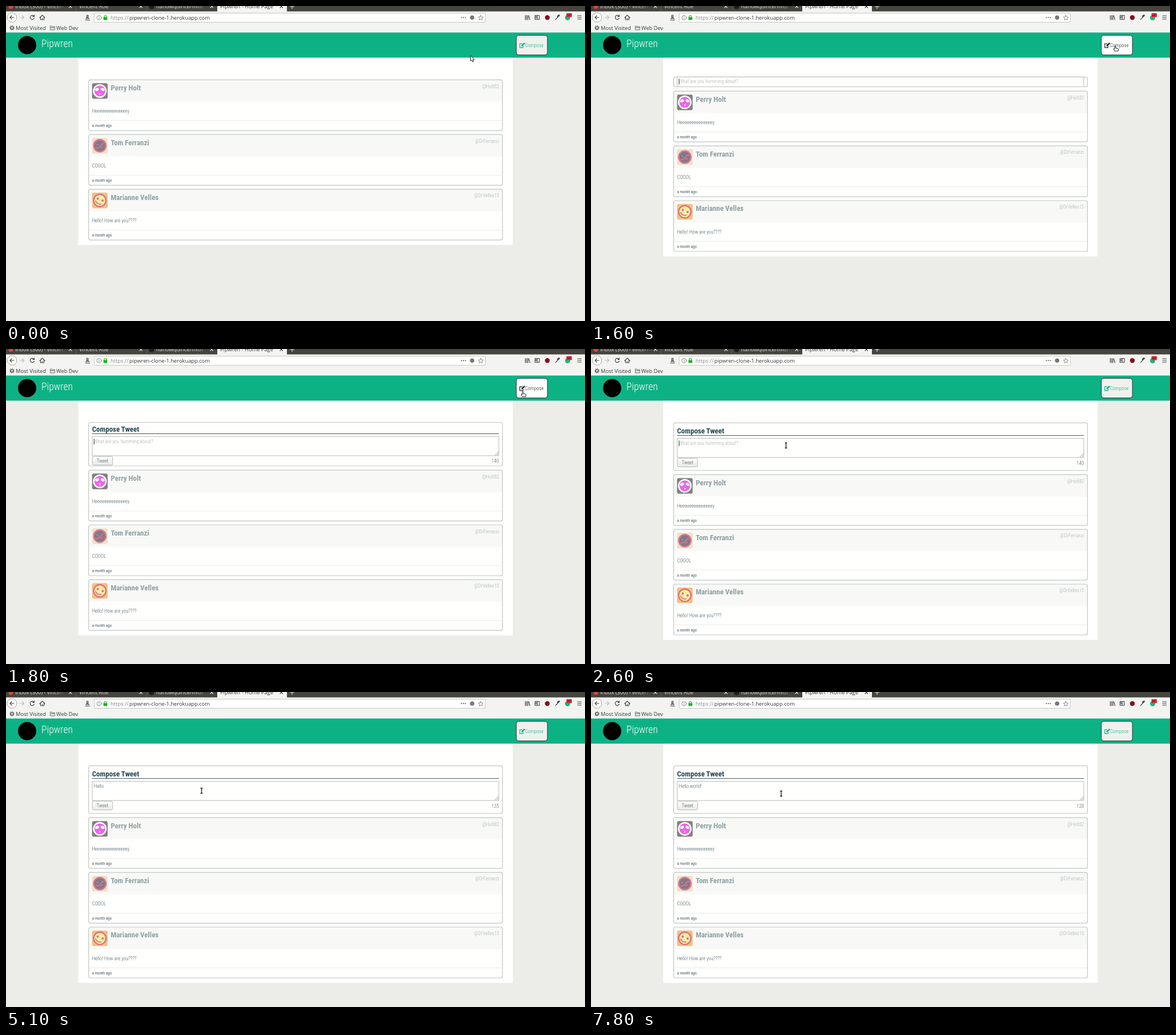
Recreate the animation shown at these times as an HTML page. Size 1014 px wide and 552 px high, loop 8000 ms.

```html
<!DOCTYPE html>
<html lang="en">
<head>
<meta charset="utf-8">
<title>Compose box</title>
<style>
  html, body { margin: 0; width: 100%; height: 100%; overflow: hidden; background: #ecede9; }
  #stage { display: block; width: 100%; height: 100%; }
  text { white-space: pre; }
  .ui { font: 9.3px "Open Sans", "Noto Sans", sans-serif; fill: #35383a; }
  .tab { fill: #d8d7d0; }
  .app { font: 300 8.8px "Roboto Condensed", Roboto, sans-serif; font-stretch: 75%; fill: #435a64; }
  .title { font-size: 17.6px; fill: #fff; }
  .name { font-size: 13px; font-weight: 700; fill: #8fa0a4; }
  .heading { font-size: 13px; font-weight: 700; fill: #244751; }
  .handle { fill: #a3b0b4; }
  .age { font-size: 7px; font-weight: 400; }
  .hint { fill: #a5a8a8; }
  .end { text-anchor: end; }
  .mid { text-anchor: middle; }
  .line { fill: none; stroke: #45484a; stroke-width: 1.2; stroke-linecap: round; stroke-linejoin: round; }
</style>
</head>
<body>
<svg id="stage" viewBox="0 0 1014 552" preserveAspectRatio="none">
  <defs>
    <linearGradient id="fade"><stop stop-color="#45443e" stop-opacity="0"/><stop offset="1" stop-color="#45443e"/></linearGradient>
    <linearGradient id="face" x2="0" y2="1"><stop stop-color="#fffffd"/><stop offset="1" stop-color="#e9eae8"/></linearGradient>
  </defs>

  <!-- browser tabs -->
  <rect width="1014" height="10" fill="#45443e"/>
  <rect x="370" width="122" height="10" fill="#f3f4f1"/>
  <g class="ui">
    <circle cx="8.500" cy="1" r="4" fill="#d9473d"/>
    <circle cx="255" cy="1" r="4.500" fill="#1c1d1e"/>
    <text class="tab" x="16" y="4">Inbox (300) - vincen</text>
    <text class="tab" x="128" y="4">Vincent Roe</text>
    <text class="tab" x="263" y="4">harlowquince/midt</text>
    <text x="375" y="4">Pipwren - Home Page</text>
  </g>
  <rect x="84" width="22" height="9" fill="url(#fade)"/>
  <rect x="332" width="22" height="9" fill="url(#fade)"/>
  <path d="M122.500 0v9M246.500 0v9" stroke="#5b5a53"/>
  <path class="line" style="stroke:#d8d7d0" d="M110.500-1.500l4.500 4.500m0-4.500l-4.500 4.500M234-1.500l4.500 4.500m0-4.500l-4.500 4.500M358-1.500l4.500 4.500m0-4.500l-4.500 4.500M497.500 1h7M501-2v6.500"/>
  <path class="line" d="M480-1.500l4.500 4.500m0-4.500l-4.500 4.500"/>

  <!-- toolbar -->
  <rect y="9.500" width="1014" height="37" fill="#f3f4f1"/>
  <rect x="154.500" y="12.500" width="685" height="16" rx="1.500" fill="#fffffd" stroke="#c6c7c4"/>
  <circle cx="10.500" cy="20" r="8.300" fill="#fdfdfb" stroke="#a5a6a4"/>
  <g class="line">
    <path d="M14 20H7m3-3l-3 3 3 3"/>
    <path d="M24.500 20h7m-3-3l3 3-3 3" stroke="#bcbdbb"/>
    <path d="M49 18a3.600 3.600 0 1 0 .3 3.300M49.500 15.800v2.600h-2.700"/>
    <path d="M59 20.500l4.500-4.500 4.500 4.500M60.500 20v4h6v-4M63.500 24v-2.500"/>
    <path d="M139 24.500h7.500M140 22l2.500-2.500 3 2.500z"/>
    <circle cx="142.700" cy="17.700" r="1.500"/>
    <path d="M909.500 16.500v7.500M911.800 16.500v7.500M914 16.500v7.500M915.500 17l2 7"/>
    <path d="M926.500 16.500h7.500v7h-7.500zM927 18.500h3m-3 2h3M930.300 16.500v7"/>
    <path d="M962.500 23.500l4.500-4.500"/><path d="M966.500 18l2-1.500" stroke-width="3"/>
    <path d="M1001 17h6.500m-6.500 3h6.500m-6.500 3h6.500"/>
    <g stroke="#77797a" stroke-width=".9">
      <circle cx="163" cy="20.500" r="3.800"/><path d="M163 20v2.300M163 18.300v.1"/>
      <path d="M831.500 16.300l1.300 2.700 3 .4-2.200 2.100.6 3-2.700-1.500-2.700 1.500.6-3-2.200-2.100 3-.4z"/>
    </g>
  </g>
  <path d="M172 20v-1.500a2 2 0 0 1 4 0v1.500" fill="none" stroke="#13b51d" stroke-width="1.200"/>
  <rect x="170.700" y="19.500" width="6.700" height="5" rx=".7" fill="#13b51d"/>
  <g fill="#55585a"><circle cx="797.500" cy="20.300" r="1"/><circle cx="801" cy="20.300" r="1"/><circle cx="804.500" cy="20.300" r="1"/></g>
  <circle cx="816.300" cy="20.300" r="3.800" fill="#77797a"/>
  <circle cx="948" cy="20.300" r="4.200" fill="#85111f"/>
  <circle cx="983.500" cy="20.500" r="4.500" fill="#17b978"/>
  <rect x="981.500" y="12.500" width="9.500" height="7" rx="1" fill="#d92c3a"/>
  <text class="ui" x="982.500" y="17.700" style="font-size:5px;fill:#5a0d14">off</text>
  <g class="ui">
    <text x="183" y="23.700" fill-opacity=".62">https://</text>
    <text x="216" y="23.700">pipwren-clone-1.herokuapp.com</text>
    <text x="17" y="41.500">Most Visited</text>
    <text x="88" y="41.500">Web Dev</text>
  </g>
  <circle class="line" cx="10.500" cy="38.300" r="2.300"/>
  <circle class="line" cx="10.500" cy="38.300" r="3.500" style="stroke-dasharray:.6 2.150"/>
  <path d="M77.500 35h3l1 1.200h4v5.800h-8zM77.500 37.500h8" fill="#d9dad8" stroke="#737674" stroke-width=".9"/>

  <!-- page -->
  <rect id="page" x="126.500" y="90" width="761" fill="#fffffd"/>
  <rect y="46.500" width="1014" height="44" fill="#0db284"/>
  <circle cx="37" cy="68.500" r="16" fill="#000"/>
  <text class="app title" x="62" y="72">Pipwren</text>
  <rect id="button" x="893.700" y="51.300" width="54.500" height="34.500" rx="4" stroke="#17302d"/>
  <g id="label">
    <path d="M905.500 69.500v3.300h-5.700v-6.600h4.500" fill="none" stroke="currentColor" stroke-width="1.200"/>
    <path d="M902.500 70.700l.4-2.200 4.600-4.400 1.700 1.700-4.600 4.500z" fill="currentColor"/>
    <text class="app" x="909" y="72" style="fill:currentColor">Compose</text>
  </g>

  <svg id="panel" x="144" width="726">
    <g id="form">
      <text class="app heading" x="6.700" y="19.200">Compose Tweet</text>
      <path d="M6.700 23h712.500" stroke="#40545c"/>
      <rect x="7" y="27.900" width="712" height="33.600" fill="#fffffd" stroke="#b9bcba"/>
      <path d="M712 61l7-7M715.500 61l3.500-3.500" stroke="#7c7f7e" stroke-width=".8"/>
      <text id="entry" class="app" x="9.800" y="39.600"></text>
      <path id="caret" d="M0 31.800v10" stroke="#222" stroke-width=".9"/>
      <rect x="7.200" y="62.700" width="35.500" height="15.300" rx="2.500" fill="url(#face)" stroke="#b4b7b5"/>
      <text class="app mid" x="25" y="73.600">Tweet</text>
      <text id="count" class="app end" x="719.300" y="74"></text>
    </g>
    <rect id="frame" x=".7" y=".7" width="724.800" rx="3" fill="none" stroke="#bfc4c2" stroke-width="1.200"/>
  </svg>
  <g id="cards"></g>

  <g id="pointers">
    <path id="arrow" d="M0 0v9.500l2.200-2 1.600 3.500 1.700-.8-1.600-3.300h3z" fill="#fff" stroke="#111" stroke-width=".9"/>
    <path id="hand" d="M-.8.800a.9.900 0 0 1 1.800 0v3l4 .8q.8.300.7 1.400l-.6 3H-.8l-2-3.200q-.5-1 .7-1.200l1.300.9z" fill="#fff" stroke="#111" stroke-width=".9"/>
    <path id="beam" d="M-2-4.500h1.500l.5.500.5-.5H2M-2 4.500h1.500l.5-.5.5.5H2M0-4v8" fill="none" stroke="#222" stroke-width="1.400"/>
  </g>
</svg>

<script>
const $ = id => document.getElementById(id);
const LOOP = 8000;

const faces = [
  `<rect width="27.300" height="27.300" rx="3" fill="#80817b"/><circle cx="13.600" cy="13.600" r="12" fill="#fff"/>
   <circle cx="13.600" cy="13.600" r="9.500" fill="#ed64ec"/>
   <ellipse cx="8.800" cy="11" rx="3.500" ry="2.500" fill="#fff" transform="rotate(-25 8.800 11)"/>
   <ellipse cx="18.500" cy="11" rx="3.500" ry="2.500" fill="#fff" transform="rotate(25 18.500 11)"/>
   <circle cx="13.600" cy="18.600" r="1.300" fill="#fff"/>`,
  `<rect width="27.300" height="27.300" rx="3" fill="#f2decb"/><circle cx="13.600" cy="13.600" r="10.800" fill="#83788c" stroke="#da7c8b" stroke-width="2.400"/>
   <path d="M6.500 17l4 1 8-8 3 .5M8 11l3 2M14 18l5-2" fill="none" stroke="#da7c8b" stroke-width="1.600"/>`,
  `<rect width="27.300" height="27.300" rx="3" fill="#f4c182"/><circle cx="13.600" cy="13.600" r="10.800" fill="#f5eda5" stroke="#de7180" stroke-width="2.400"/>
   <circle cx="10" cy="10.500" r="2" fill="#de7180"/><circle cx="18.500" cy="14" r="2" fill="#de7180"/>
   <path d="M6 14q2 7 10.500 6" fill="none" stroke="#de7180" stroke-width="1.800"/>`
];
const posts = [
  ["Perry Holt", "@Holt82", "H" + "e".repeat(14) + "y"],
  ["Tom Ferranzi", "@DrFerranzi", "COOOL"],
  ["Marianne Velles", "@DrVelles15", "Hello! How are you????"]
];
$("cards").innerHTML = posts.map(([name, handle, body], i) => `
  <g transform="translate(144 ${128.600 + i * 95.900})">
    <rect x=".7" y=".7" width="724.800" height="89" rx="3" fill="#fffffd"/>
    <path d="M1 1h724v38.300H1z" fill="#f8f9f6"/>
    <path d="M1 72.200h724" stroke="#eaecea"/>
    <rect x=".7" y=".7" width="724.800" height="89" rx="3" fill="none" stroke="#bfc6c5" stroke-width="1.200"/>
    <g transform="translate(6.700 6.700)">${faces[i]}</g>
    <text class="app name" x="39.400" y="19.200">${name}</text>
    <text class="app handle end" x="719.500" y="15">${handle}</text>
    <text class="app" x="6.700" y="58.800">${body}</text>
    <text class="app age" x="6.700" y="83.500">a month ago</text>
  </g>`).join("");

// Step tables: each row holds from its time until the next row.
const path = [
  [0, 813.500, 87], [500, 816, 89], [600, 826, 91], [700, 846, 90], [800, 869, 87],
  [900, 891, 81], [1000, 905, 75], [1100, 913, 72], [1200, 918, 70],
  [1800, 905, 74.500], [1900, 850, 96], [2000, 735, 120], [2100, 590, 141],
  [2200, 465, 158], [2300, 386, 163], [2400, 355, 166], [2500, 345, 168],
  [2600, 341.500, 169], [3000, 342.500, 173], [7700, 337, 176], [7800, 333, 178]
];
const typing = [
  [0, 0, 140], [3800, 1, 140], [4000, 2, 139], [4200, 3, 138], [4400, 4, 137],
  [4700, 5, 136], [5100, 6, 135], [5500, 7, 134], [5800, 8, 133], [5900, 9, 132],
  [6100, 10, 131], [6300, 11, 130], [7100, 12, 129], [7200, 12, 128]
];
const blink = [[0, 1], [5100, 0], [5300, 1], [7500, 0]];
const at = (table, t) => table.findLast(row => row[0] <= t);

const set = (id, attrs) => {
  for (const key in attrs) $(id).setAttribute(key, attrs[key]);
};
const show = (id, on) => set(id, { visibility: on ? "visible" : "hidden" });

function drawPanel(t) {
  const u = Math.min(1, Math.max(0, (t - 1476) / 400));
  const open = 0.5 - Math.cos(u * Math.PI) / 2;
  const height = 85 * open;
  const scroll = Math.min(28, Math.max(0, 63.600 - 66.800 * open));
  set("panel", { y: 122.300 + 6.300 * open, height, display: open > 0.05 ? "inline" : "none" });
  set("frame", { height: Math.max(0, height - 1.400) });
  set("form", { transform: `translate(0 ${-scroll})` });
  set("cards", { transform: `translate(0 ${90.900 * open})` });
  set("page", { height: 328.800 + 91 * open });
}

function drawEntry(t) {
  const [, length, left] = at(typing, t);
  const entry = $("entry");
  entry.textContent = length ? "Hello world!".slice(0, length) : "What are you humming about?";
  entry.classList.toggle("hint", !length);
  $("count").textContent = left;
  const x = 10.200 + (length ? entry.getComputedTextLength() : 0);
  set("caret", { transform: `translate(${x} 0)` });
  set("caret", { opacity: at(blink, t)[1] });
}

function drawPointer(t) {
  const [, x, y] = at(path, t);
  const hover = x > 893 && y < 86;
  const beam = x < 863 && y > 157;
  set("pointers", { transform: `translate(${x} ${y})` });
  show("hand", hover);
  show("beam", beam);
  show("arrow", !hover && !beam);
  set("label", { color: hover ? "#152426" : "#0db284" });
  set("button", { fill: hover && t >= 1500 ? "#fffffd" : "#f0f1ee" });
}

function draw(now) {
  const t = Math.floor((now - start) % LOOP / 100) * 100;
  drawPanel(t);
  drawEntry(t);
  drawPointer(t);
}

$("frame").insertAdjacentHTML("beforebegin", "");
const back = $("frame").cloneNode();
back.removeAttribute("id");
set("panel", { style: "background:#ecede9" });
set("panel", { overflow: "hidden" });

const start = performance.now();
function tick() {
  draw(performance.now());
  requestAnimationFrame(tick);
}
tick();
</script>
</body>
</html>
```
